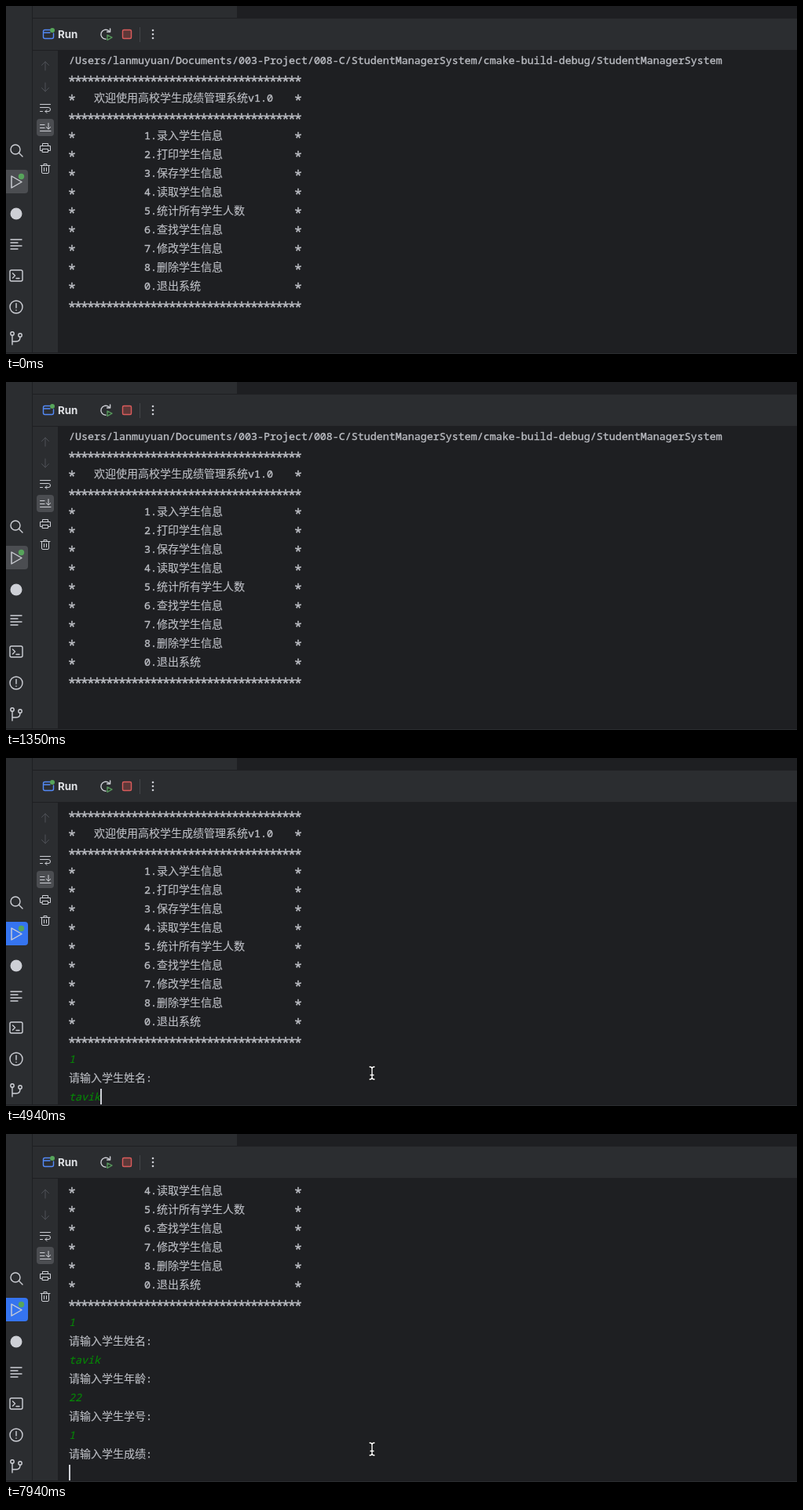
These frames come from a looping animation (1007 by 444 pixels, 8 s). An HTML page:

```html
<!DOCTYPE html>
<html lang="zh-CN">
<head>
<meta charset="utf-8">
<title>Console session</title>
<style>
  html, body { margin: 0; width: 100%; height: 100%; overflow: hidden; background: #1e1f22; }
  svg { position: absolute; left: 0; top: 0; display: block; }
  .ui { font: 500 13.33px Inter, sans-serif; fill: #dfe1e5; }
  .bold { font-weight: 700; }
  .ico { fill: none; stroke: #ced0d6; stroke-width: 1.4; stroke-linecap: round; stroke-linejoin: round; }
  .thin { stroke-width: 1; }
  .dim { stroke: #4e5157; }
  .console {
    position: absolute; left: 67px; top: 57px; width: 940px; height: 385px; overflow: hidden;
    font: 500 13.3333px/24px "Noto Sans Mono", monospace; color: #bcbec4; white-space: pre;
    -webkit-text-stroke: .35px;
  }
  .row { position: relative; height: 24px; padding-left: 13px; }
  .cjk { font: 400 14px/0 "Noto Sans CJK SC", "Noto Sans CJK", sans-serif; -webkit-text-stroke: .15px; }
  .star { position: relative; left: -1.4px; top: 5.2px; font-size: 18px; line-height: 0; letter-spacing: -2.8px; }
  .edge { position: absolute; left: 301px; top: 0; }
  .typed { color: #078507; font-style: italic; -webkit-text-stroke: .15px; }
  #caret { position: absolute; width: 2px; height: 20px; background: #ced0d6; }
  #band { position: absolute; left: 0; width: 100%; height: 24px; background: #2b2d30; }
  #bar { position: absolute; left: 15px; top: 377px; width: 940px; height: 8px; border-radius: 4px; background: #4f5053; }
  #build .row { position: absolute; left: 0; }
</style>
</head>
<body>
<svg width="1007" height="444" viewBox="0 0 1007 444">
  <path fill="#2b2d30" d="M0 0H33V442H0ZM34 0H294V15H34ZM34 16H1007V56H34ZM34 57H66V442H34ZM0 443H1007V444H0Z"/>

  <rect id="mark" x="-4" width="32" height="30" rx="4"/>
  <g class="ico">
    <circle cx="12" cy="183" r="6"/><path d="M16.5 187.5L21 192"/>
    <path d="M7 217V232L20 224.5Z"/>
    <circle cx="13" cy="265" r="7.5" fill="#ced0d6" stroke="none"/>
    <path d="M6 298H20M6 302H15M6 306H20M6 310H15"/>
    <rect x="5" y="337" width="16" height="14" rx="2"/><path d="M8.5 341L11.5 344L8.5 347M13 347.5H17"/>
    <circle cx="13" cy="384" r="8"/><path d="M13 379.5V385M13 388V388.3"/>
    <circle cx="8" cy="418" r="2.2"/><circle cx="18" cy="420" r="2.2"/>
    <path d="M8 420.5V432M8 428H13Q18 428 18 422.5"/>
  </g>

  <g id="runHead">
    <circle cx="19.5" cy="217.5" r="3.7" fill="#57a55b"/>
    <g class="ico">
      <path d="M56 30.5H49.5Q47.5 30.5 47.5 32.5V39.5Q47.5 41.5 49.5 41.5H58.5Q60.5 41.5 60.5 39.5V35M48 34H56" stroke="#548af7"/>
      <path d="M131 31.8A6 6 0 1 0 127 42.2M132.6 29V33H128.6"/>
      <path d="M129 37V43.5L135 40.2Z" stroke="#57965c" fill="#253627"/>
      <rect x="148.5" y="30.5" width="11" height="11" rx="1.5" stroke="#db5c5c" fill="#5e3838"/>
    </g>
    <circle cx="59" cy="31" r="3" fill="#57a55b"/>
    <text class="ui bold" x="66" y="41">Run</text>
    <path d="M170.5 27V46" stroke="#43454a"/>
    <g fill="#ced0d6"><circle cx="187" cy="31" r="1.3"/><circle cx="187" cy="36" r="1.3"/><circle cx="187" cy="41" r="1.3"/></g>
  </g>

  <g id="buildHead">
    <text class="ui bold" x="46" y="41">Messages</text>
    <text class="ui" x="139" y="41">Build</text>
    <path d="M182.5 33.5L189.5 40.5M189.5 33.5L182.5 40.5" stroke="#868a91"/>
    <rect x="127" y="54" width="74" height="3" rx="1.5" fill="#6f737a"/>
    <rect x="44" y="71" width="12" height="12" rx="1.5" fill="#5a5d63"/>
    <path d="M40 93.5H60" stroke="#43454a"/>
  </g>

  <g id="tools" class="ico thin">
    <path class="dim" d="M50 82V71M45.5 75.5L50 71L54.5 75.5M50 98V109M45.5 104.5L50 109L54.5 104.5"/>
    <path d="M43.5 125.5H56.5M43.5 129.5H54Q56.5 129.5 56.5 132T54 134.5H50M52 132.5L50 134.5L52 136.5M43.5 134.5H46.5"/>
    <rect x="39" y="144" width="22" height="22" rx="4" fill="#4b4d51" stroke="none"/>
    <path d="M43.5 151.5H49M43.5 155.5H49M43.5 159.5H57M54 149.5V157M51.3 154.5L54 157L56.7 154.5"/>
    <path d="M46.5 178.5V175.5H53.5V178.5M46.5 184.5H43.5V178.5H56.5V184.5H53.5M46.5 182.5H53.5V186.5H46.5Z"/>
    <path d="M44 203.5H56M48 203.5V201.5H52V203.5M45.5 203.5V212Q45.5 213.5 47 213.5H53Q54.5 213.5 54.5 212V203.5M48.5 206.5V210.5M51.5 206.5V210.5"/>
  </g>
</svg>

<div class="console" id="run"><div id="log"></div><div id="caret"></div></div>
<div class="console" id="build"><div id="band"></div><div id="bar"></div></div>

<svg id="mouse" width="13" height="22" viewBox="-6.5 -11 13 22" fill="none" stroke-linecap="round">
  <defs><path id="beam" d="M-3 -8Q0 -8 0 -5.5Q0 -8 3 -8M0 -6V6M-3 8Q0 8 0 5.5Q0 8 3 8M-2 2.5H2"/></defs>
  <use href="#beam" stroke="#111" stroke-width="3"/>
  <use href="#beam" stroke="#fff" stroke-width="1.4"/>
</svg>

<script>
const LOOP = 8000, ROW = 24, CELL = 8, FIRST_INPUT = 14;
const $ = id => document.getElementById(id);
const home = '/Users/lanmuyuan/Documents/003-Project/008-C/StudentManagerSystem/cmake-build-debug';
const menu = ['录入学生信息', '打印学生信息', '保存学生信息', '读取学生信息', '统计所有学生人数',
  '查找学生信息', '修改学生信息', '删除学生信息', '退出系统'];
const prompts = ['姓名', '年龄', '学号', '成绩'];

const cjk = s => `<span class="cjk">${s}</span>`;
const star = s => `<span class="star">${s}</span>`;
const boxed = s => star('*') + s + `<span class="edge">${star('*')}</span>`;

function addRow(parent, html = '', kind = '') {
  const row = document.createElement('div');
  row.className = 'row ' + kind;
  row.innerHTML = html;
  return parent.appendChild(row);
}

const log = $('log'), rule = star('*'.repeat(37));
addRow(log, home + '/StudentManagerSystem');
addRow(log, rule);
addRow(log, boxed('   ' + cjk('欢迎使用高校学生成绩管理系统') + 'v1.0'));
addRow(log, rule);
menu.forEach((name, i) => addRow(log, boxed(' '.repeat(11) + (i + 1) % menu.length + '.' + cjk(name))));
addRow(log, rule);

const answerRows = [addRow(log, '', 'typed')], promptRows = [];
for (const what of prompts) {
  promptRows.push(addRow(log, cjk('请输入学生' + what) + ':'));
  answerRows.push(addRow(log, '', 'typed'));
}

const bars = '='.repeat(20);
const buildRows = [
  bars + '[ Build | StudentManagerSystem | Debug ]' + bars,
  '/Applications/CLion.app/Contents/bin/cmake/mac/bin/cmake --build ' + home + ' --target StudentManagerSystem'
].map((text, i) => {
  const row = addRow($('build'), text);
  row.style.top = i * ROW + 'px';
  return row;
});

// Each step keeps whatever it does not change; built = number of build lines, 0 shows the run panel.
const changes = [
  [0, { built: 0, focus: false, caret: false, input: '', mouse: null }],
  [300, { focus: true, caret: true }],
  [750, { caret: false }],
  [1050, { built: 1, focus: false }],
  [1200, { built: 2 }],
  [1350, { built: 0 }],
  [1650, { mouse: [635.5, 153] }],
  [1800, { mouse: [508.5, 344] }],
  [2100, { mouse: [472, 396] }],
  [2250, { mouse: [466, 402] }],
  [2390, { focus: true, caret: true }],
  [2690, { input: '1' }],
  [2990, { input: '1\n' }],
  [3740, { caret: false }],
  [4040, { caret: true, input: '1\nt' }],
  [4190, { input: '1\nta' }],
  [4640, { input: '1\ntav' }],
  [4790, { input: '1\ntavi' }],
  [4940, { input: '1\ntavik' }],
  [5390, { input: '1\ntavik\n' }],
  [6290, { input: '1\ntavik\n2' }],
  [6590, { input: '1\ntavik\n22' }],
  [6740, { input: '1\ntavik\n22\n' }],
  [7340, { caret: false }],
  [7640, { caret: true, input: '1\ntavik\n22\n1' }],
  [7940, { input: '1\ntavik\n22\n1\n' }]
];
let state = {};
const steps = changes.map(([at, change]) => ({ at, ...(state = { ...state, ...change }) }));

const show = (el, on) => { el.style.display = on ? '' : 'none'; };

function draw({ built, focus, caret, input, mouse }) {
  const running = !built;
  for (const id of ['run', 'runHead']) show($(id), running);
  for (const id of ['build', 'buildHead']) show($(id), !running);
  $('tools').setAttribute('transform', `translate(0 ${running ? 0 : 33})`);
  $('mark').setAttribute('y', running ? 209 : 289);
  $('mark').setAttribute('fill', focus ? '#3574f0' : '#4b4d51');

  buildRows.forEach((row, i) => show(row, i < built));
  $('band').style.top = built * ROW + 'px';
  show($('bar'), built > 1);

  const answers = input.split('\n'), last = answers.length - 1;
  const scroll = last ? last * 2 * ROW - 27 : 0;
  log.style.transform = `translateY(${-scroll}px)`;
  answerRows.forEach((row, i) => { row.textContent = answers[i] || ''; });
  promptRows.forEach((row, i) => { row.style.visibility = i < last ? 'visible' : 'hidden'; });

  show($('caret'), caret);
  $('caret').style.left = 13 + answers[last].length * CELL + 'px';
  $('caret').style.top = (FIRST_INPUT + last * 2) * ROW + 2 - scroll + 'px';

  show($('mouse'), mouse);
  if (mouse) $('mouse').style.transform = `translate(${mouse[0] - 6.5}px, ${mouse[1] - 11}px)`;
}

let shown;
function tick() {
  const t = performance.now() % LOOP;
  const step = steps.findLast(s => s.at <= t);
  if (step !== shown) draw(shown = step);
  requestAnimationFrame(tick);
}
tick();
</script>
</body>
</html>
```
